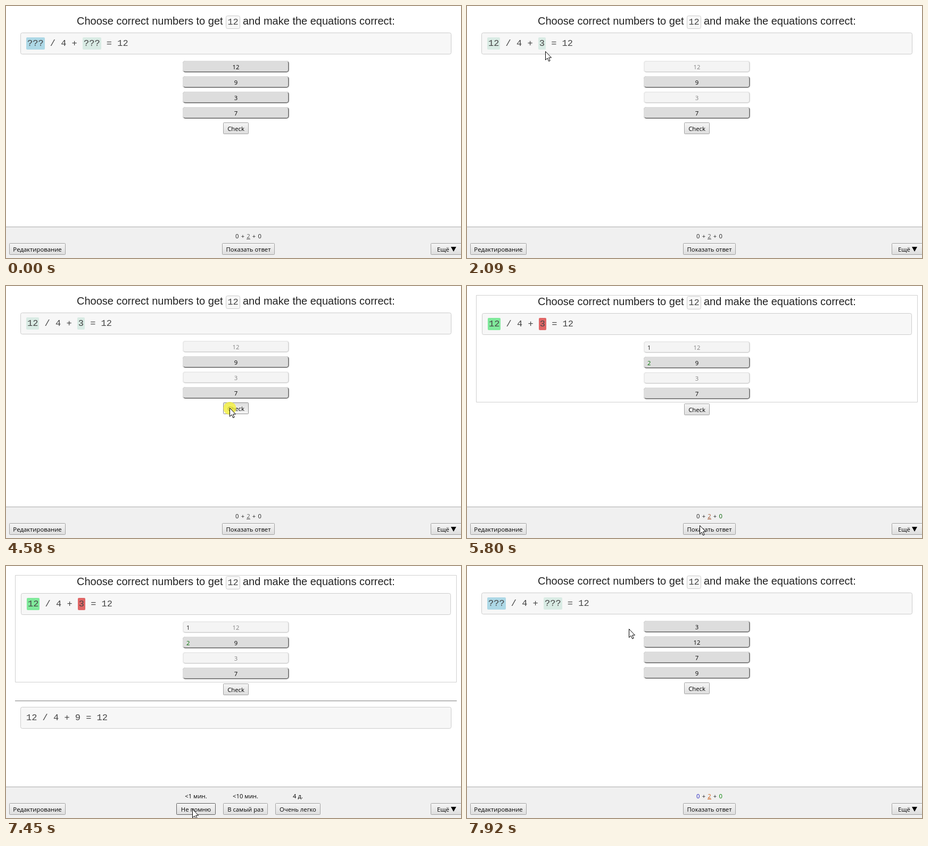
These frames come from a looping animation (855x474 px, 8 s). An HTML page with a canvas:

```html
<!DOCTYPE html>
<html lang="en">
<head>
<meta charset="utf-8">
<title>Equation card</title>
<style>
html, body { margin: 0; width: 100%; height: 100%; overflow: hidden; background: #fff; }
canvas { display: block; }
</style>
</head>
<body>
<canvas id="stage" width="855" height="474"></canvas>
<script>
const ctx = document.getElementById('stage').getContext('2d');
const LOOP = 8000;
const UI = '11.3px "Open Sans", "Noto Sans", sans-serif';
const TITLE = '20px "Liberation Sans", Arial, sans-serif';
const MONO = '17px "Liberation Mono", "Courier New", monospace';
const CHAR = 10.2;
const INK = '#222', CODE = '#444';
const BLUE = '#add8e6', MINT = '#d9ebe4', GREEN = '#80e99b', RED = '#e06666';

// Moments when a click takes effect.
const FIRST = 915, SECOND = 1670, CHECKED = 4655, ANSWERED = 6595, RATED = 7380;
const NEXT = 7530;
const PRESS = 85;

const pressing = (t, release) => t >= release - PRESS && t < release;

// The pointer rests between these moves.
const moves = [
  { from: 70, to: 290, x: 425, y: 197 },
  { from: 520, to: 840, x: 443, y: 118 },
  { from: 1000, to: 1400, x: 436, y: 172 },
  { from: SECOND, to: 2080, x: 147, y: 85 },
  { from: 2100, to: 2300, x: 142, y: 64 },
  { from: 2560, to: 3020, x: 420, y: 229 },
  { from: CHECKED, to: 4880, x: 470, y: 279 },
  { from: 5130, to: 5350, x: 540, y: 200 },
  { from: 5350, to: 5560, x: 330, y: 320 },
  { from: 5560, to: 5770, x: 437, y: 450 },
  { from: 5810, to: 5970, x: 431, y: 455 },
  { from: ANSWERED, to: 7140, x: 350, y: 457 },
  { from: NEXT, to: 7910, x: 304, y: 118 }
];

function pointerAt(t) {
  let x = 656, y = 399;
  for (const m of moves) {
    const u = Math.min(1, Math.max(0, (t - m.from) / (m.to - m.from)));
    const e = u * u * (3 - 2 * u);
    x += (m.x - x) * e;
    y += (m.y - y) * e;
  }
  return [Math.round(x), Math.round(y)];
}

function text(s, x, y, font = UI, color = '#000', align = 'left') {
  ctx.font = font;
  ctx.fillStyle = color;
  ctx.textAlign = align;
  ctx.fillText(s, x, y);
}

function rect(x, y, w, h, color) {
  ctx.fillStyle = color;
  ctx.fillRect(x, y, w, h);
}

function round(x, y, w, h, r, fill) {
  ctx.beginPath();
  ctx.roundRect(x, y, w, h, r);
  ctx.fillStyle = fill;
  ctx.fill();
}

function frame(x, y, w, h, r, fill, stroke) {
  round(x + 0.5, y + 0.5, w - 1, h - 1, r, fill);
  ctx.strokeStyle = stroke;
  ctx.lineWidth = 1;
  ctx.stroke();
}

function pushButton(label, x, y, w, { border = '#a3a3a3', pressed = false } = {}) {
  const g = ctx.createLinearGradient(0, y, 0, y + 22);
  g.addColorStop(pressed ? 1 : 0, '#f6f6f6');
  g.addColorStop(pressed ? 0 : 1, '#dddddd');
  frame(x, y, w, 22, 1, g, border);
  text(label, x + w / 2, y + 16, UI, '#000', 'center');
}

function option(label, y, used, mark) {
  const x = 332, w = 200, h = 22;
  const [fill, light, dark] = used
    ? ['#f4f4f4', '#eaeaea', '#d8d8d8']
    : ['#dddddd', '#dddddd', '#828282'];
  round(x, y, w, h, 5, dark);
  ctx.save();
  ctx.beginPath();
  ctx.moveTo(x, y + h);
  ctx.lineTo(x, y);
  ctx.lineTo(x + w, y);
  ctx.lineTo(x + w - 3, y + 3);
  ctx.lineTo(x + 3, y + h - 3);
  ctx.clip();
  round(x, y, w, h, 5, light);
  ctx.restore();
  round(x + 2, y + 2, w - 4, h - 4, 3, fill);
  text(label, x + w / 2, y + 16, UI, used ? '#808080' : '#000', 'center');
  text(mark, x + 7, y + 16, UI, used ? INK : '#007000');
}

function equation(slots, x, y) {
  const plain = s => {
    text(s, x, y, MONO, CODE);
    x += s.length * CHAR;
  };
  const slot = ([label, color]) => {
    const left = Math.round(x), end = x + label.length * CHAR + 4;
    round(left, y - 16, Math.round(end) - left, 23, 2, color);
    text(label, x + 2, y, MONO, CODE);
    x = end;
  };
  slot(slots[0]);
  plain(' / 4 + ');
  slot(slots[1]);
  plain(' = 12');
}

function slotsAt(t) {
  if (t < FIRST || t >= NEXT) return [['???', BLUE], ['???', MINT]];
  if (t < SECOND) return [['12', MINT], ['???', BLUE]];
  return t < CHECKED ? [['12', MINT], ['3', MINT]] : [['12', GREEN], ['3', RED]];
}

function card(t) {
  const checked = t >= CHECKED && t < NEXT, d = checked ? 1 : 0;
  if (checked) frame(17, 17, 830, 202, 0, '#fff', '#d0d0d0');

  text('Choose correct numbers to get', 133, 35 + d, TITLE, INK);
  frame(413, 18 + d, 27, 25, 3, '#f8f8f8', '#ccc');
  text('12', 416.4, 35 + d, MONO, CODE);
  text('and make the equations correct:', 445, 35 + d, TITLE, INK);

  frame(27 + d, 50 + d, 810 - 2 * d, 41, 3, '#f7f7f7', '#ccc');
  equation(slotsAt(t), 38 + d, 75 + d);

  const labels = t < NEXT ? ['12', '9', '3', '7'] : ['3', '12', '7', '9'];
  labels.forEach((label, i) => {
    const used = t < NEXT && (label === '12' && t >= FIRST || label === '3' && t >= SECOND);
    option(label, 103 + d + 29 * i, used, checked && i < 2 ? String(i + 1) : '');
  });

  const hover = t >= 3000 && t < CHECKED;
  pushButton('Check', 408, 219 + 2 * d, 48,
    { border: hover ? '#909090' : '#a3a3a3', pressed: pressing(t, CHECKED) });
}

function answer() {
  rect(17, 253, 830, 1, '#909090');
  rect(17, 254, 830, 1, '#e6e6e6');
  frame(27, 265, 810, 41, 3, '#f7f7f7', '#ccc');
  text('12 / 4 + 9 = 12', 38, 290, MONO, CODE);
}

function score(t) {
  const colors = t < 5190 ? [INK, '#555', INK]
    : t < NEXT ? [INK, '#a0522d', '#006000'] : ['#2020c0', '#cc5a10', '#008000'];
  const center = 455.5;
  colors.forEach((color, i) => text(i === 1 ? '2' : '0', center + (i - 1) * 21.3, 437, UI, color, 'center'));
  for (const side of [-1, 1]) text('+', center + side * 10.5, 437, UI, INK, 'center');
  rect(452, 438, 7, 1, colors[1]);
}

function rating(interval, label, x, w, look) {
  text(interval, x + w / 2, 437, UI, '#000', 'center');
  pushButton(label, x, 446, w, look);
}

function footer(t, answered) {
  rect(0, 415, 855, 1, '#aaa');
  rect(0, 416, 855, 58, '#f0f0f0');
  pushButton('Редактирование', 6, 446, 106);
  if (answered) {
    rating('<1 мин.', 'Не помню', 320, 74, { border: '#606060', pressed: pressing(t, RATED) });
    rating('<10 мин.', 'В самый раз', 408, 84);
    rating('4 д.', 'Очень легко', 506, 85);
  } else {
    score(t);
    pushButton('Показать ответ', 406, 446, 99, { pressed: pressing(t, ANSWERED) });
  }
  pushButton('', 798, 446, 60);
  text('Ещё', 810, 462);
  ctx.beginPath();
  ctx.moveTo(836, 453);
  ctx.lineTo(846, 453);
  ctx.lineTo(841, 462);
  ctx.fill();
}

function pointer(t) {
  if (t < moves[0].from) return;
  const [x, y] = pointerAt(t);
  if ([FIRST, SECOND, CHECKED, ANSWERED, RATED].some(release => pressing(t, release))) {
    ctx.beginPath();
    ctx.arc(x + 0.5, y + 1, 12, 0, 2 * Math.PI);
    ctx.fillStyle = 'rgba(247, 243, 40, 0.72)';
    ctx.fill();
  }
  const arrow = new Path2D('M0 0V16L3.6 12.6L6.2 18.4L8.6 17.4L6.2 11.6H11Z');
  ctx.save();
  ctx.translate(x + 0.5, y + 0.5);
  ctx.fillStyle = '#fff';
  ctx.fill(arrow);
  ctx.strokeStyle = '#000';
  ctx.lineWidth = 1;
  ctx.stroke(arrow);
  ctx.restore();
}

function draw(t) {
  const answered = t >= ANSWERED && t < NEXT;
  rect(0, 0, 855, 474, '#fff');
  card(t);
  if (answered) answer();
  footer(t, answered);
  pointer(t);
}

const begin = performance.now();
function tick() {
  draw((performance.now() - begin) % LOOP);
  requestAnimationFrame(tick);
}
tick();
</script>
</body>
</html>
```
